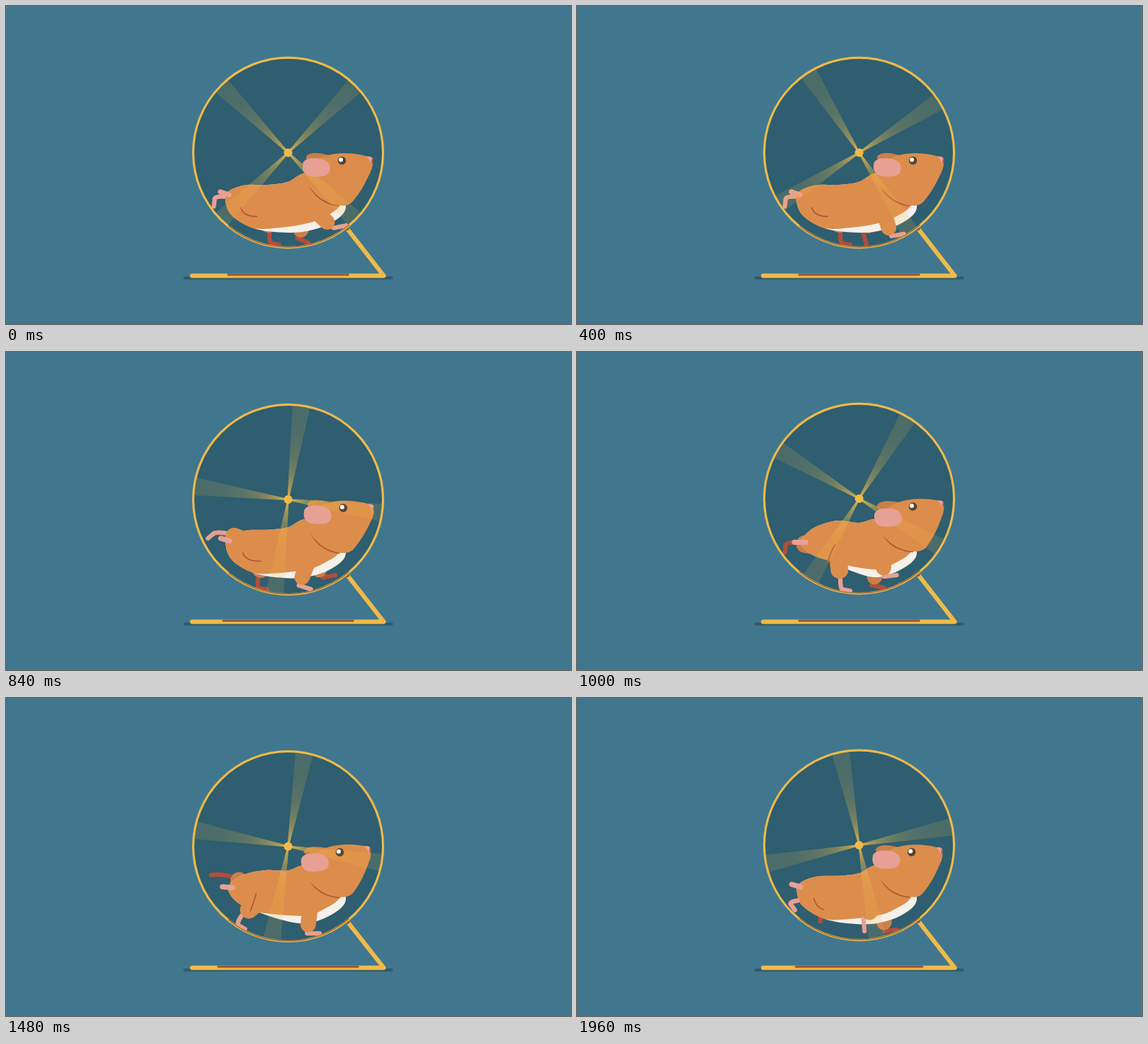
Write an HTML page with a canvas that moves like this. It is 768x432 px and loops after 2 s.

```html
<!DOCTYPE html>
<html lang="en">
<head>
<meta charset="utf-8">
<title>Hamster wheel</title>
<style>
  html, body { margin: 0; width: 100%; height: 100%; overflow: hidden; background: #40778e; }
  canvas { display: block; width: 768px; height: 432px; }
</style>
</head>
<body>
<canvas id="stage" width="768" height="432"></canvas>
<script>
const ctx = document.getElementById('stage').getContext('2d');
const STEP = 40, STEPS = 50, STRIDE = 10, FRONT_STRIDE = 8.5;
const HUB_X = 383.5, RADIUS = 129, SPIN = 28.24;
const C = {
  bg: '#40778e', disk: '#2e5e6f', gold: '#f0ba4a', brown: '#8f5a3d', shadow: '#2f5a6b',
  fur: '#dc8d4b', farFur: '#c8804b', line: '#ad5537', pink: '#e7a094', red: '#b04e3c',
  white: '#f5f0ea', eye: '#54452f'
};

// Hind ankle path, evenly spaced over one stride, with shank and foot angles
const KICK = [
  { x: 301, y: 275, shank: 172, foot: 55 },
  { x: 298, y: 246, shank: 188, foot: 140 },
  { x: 318, y: 250, shank: 185, foot: 180 },
  { x: 358, y: 309, shank: 92, foot: 10 },
  { x: 320, y: 296, shank: 124, foot: 30 }
];
const STANCE = 0.72; // share of the front stride spent on the wheel

const rad = deg => deg * Math.PI / 180;
const polar = ([x, y], deg, r) => [x + r * Math.cos(rad(deg)), y + r * Math.sin(rad(deg))];
const frac = v => v - Math.floor(v);

// The wheel sinks quickly and rises slowly, twice per stride
function bobAt(n) {
  const t = n % 5;
  return t < 2 ? t / 2 : (5 - t) / 3;
}
const hubY = n => 199.2 + 2.4 * bobAt(n);
const floorY = (x, n) => hubY(n) + Math.sqrt(RADIUS ** 2 - (x - HUB_X) ** 2);

function toward(from, to, dist) {
  const dx = to[0] - from[0], dy = to[1] - from[1], k = dist / Math.hypot(dx, dy);
  return [from[0] + dx * k, from[1] + dy * k];
}

function loopSpline(keys, phase, name) {
  const at = frac(phase) * keys.length, i = Math.floor(at), t = at - i;
  const [p, a, b, q] = [-1, 0, 1, 2].map(d => keys[(i + d + keys.length) % keys.length][name]);
  return a + t / 2 * (b - p + t * (2 * p - 5 * a + 4 * b - q + t * (3 * (a - b) + q - p)));
}

function stroke(color, width, ...pts) {
  ctx.beginPath();
  pts.forEach(p => ctx.lineTo(...p));
  ctx.strokeStyle = color;
  ctx.lineWidth = width;
  ctx.stroke();
}

function bend(color, width, a, b, c) {
  ctx.beginPath();
  ctx.moveTo(...a);
  ctx.quadraticCurveTo(...b, ...c);
  ctx.strokeStyle = color;
  ctx.lineWidth = width;
  ctx.stroke();
}

function fill(color, path) {
  ctx.fillStyle = color;
  ctx.fill(new Path2D(path));
}

function disc(color, x, y, r) {
  ctx.fillStyle = color;
  ctx.beginPath();
  ctx.arc(x, y, r, 0, 7);
  ctx.fill();
}

function arc(color, width, y, r, from, to) {
  ctx.beginPath();
  ctx.arc(HUB_X, y, r, rad(from), rad(to));
  ctx.strokeStyle = color;
  ctx.lineWidth = width;
  ctx.stroke();
}

// Closed smooth curve through points
function blob(color, pts) {
  const n = pts.length, at = i => pts[(i + n) % n];
  ctx.beginPath();
  ctx.moveTo(...pts[0]);
  for (let i = 0; i < n; i++) {
    const [p, a, b, q] = [at(i - 1), at(i), at(i + 1), at(i + 2)];
    ctx.bezierCurveTo(
      a[0] + (b[0] - p[0]) / 6, a[1] + (b[1] - p[1]) / 6,
      b[0] - (q[0] - a[0]) / 6, b[1] - (q[1] - a[1]) / 6, b[0], b[1]);
  }
  ctx.fillStyle = color;
  ctx.fill();
}

function hindLeg(phase, fur, skin) {
  const [x, y, shank, foot] = ['x', 'y', 'shank', 'foot']
    .map(name => loopSpline(KICK, phase + 0.1, name));
  const ankle = [x, y], hip = [354, 268];
  const heel = polar(ankle, shank, 13), toe = polar(heel, foot, 14);
  bend(skin, 6, ankle, heel, toward(heel, toe, 4));
  stroke(skin, 6, toward(heel, toe, 4), toe);
  stroke(fur, 24, hip, toward(ankle, hip, 13));
}

function frontLeg(phase, n, fur, skin) {
  const p = frac(phase), swing = Math.max(0, (p - STANCE) / (1 - STANCE));
  const sweep = swing ? 1 - swing ** 2 : p / STANCE;
  const x = 462 - 73 * sweep;
  const toe = [x, floorY(x, n) - 3.5 - 18 * Math.sin(Math.PI * swing)];
  const wrist = polar(toe, 168 + 105 * sweep ** 3, 17);
  const shoulder = [415, 274], elbow = toward(wrist, shoulder, 12);
  stroke(skin, 6, elbow, wrist, toe);
  stroke(fur, 21, shoulder, elbow);
}

// s is 1 with the back stretched low and -1 with it arched
function torso(s) {
  const pt = (x, y, sx, sy) => [x - sx * s, y + sy * s];
  const back = [
    [445, 238], [408, 227], pt(383, 235.5, 0, 3.5), pt(355, 236, 0, 7), pt(328, 239.5, 0, 3.5),
    pt(309, 248, 3, 1.5), pt(301, 260.5, 3, 0), pt(313, 279.5, 7, 4), pt(340.5, 293, 5, 8.5)
  ];
  const belly = pt(373, 302.5, 0, 5);
  blob(C.white, [...back, belly, [408, 306], [443, 294], [462, 273]]);
  blob(C.fur, [...back, [belly[0], belly[1] - 6.5], [408, 295.5], [430, 288], [455, 269]]);
}

// Paints in the frame of the nodding head
function onHead(n, paint) {
  const g = 2 * Math.PI * n / STRIDE;
  ctx.save();
  ctx.translate(456.6 + 3 * Math.sin(g), 210 + 1.5 * bobAt(n) + 2 * Math.sin(g));
  ctx.rotate(rad(2.7 * Math.cos(g - Math.PI / 5) - 2.5));
  ctx.translate(-457, -210);
  paint(Math.cos(g));
  ctx.restore();
}

function skull() {
  fill(C.farFur, 'M408 206C410 198 424 198 440 203L434 212L412 211Z');
  fill(C.line, 'M412 243C418 259 434 270 452 272L454 269C437 267 424 260 412 243Z');
  fill(C.fur, 'M406 230C414 207 438 200 460 200C475 200 487 203 497 206Q501 212 497 223' +
    'C490 238 483 253 470 267Q464 272 456 271C436 270 421 258 412 244Z');
  fill(C.pink, 'M490 205Q497 203 499 208Q499 213 496 215Q495 208 490 205Z');
  stroke(C.red, 1.3, [498.5, 208], [497.5, 213]);
}

function face(s) {
  disc(C.eye, 457, 210, 5.6);
  disc('#fff', 455.6, 208.8, 2.9);
  ctx.translate(0, 1.5 - 1.5 * s);
  fill(C.pink, 'M404 213C407 206 417 206 425 207C436 208 441 214 441 220' +
    'C441 229 434 232 424 231.5C411 232 401 228 404 213Z');
}

function hamster(n) {
  const gait = n / STRIDE, reach = n / FRONT_STRIDE;
  const s = Math.cos(2 * Math.PI * gait), c = Math.sin(2 * Math.PI * gait);
  hindLeg(gait + 0.5, C.farFur, C.red);
  frontLeg(reach + 0.5, n, C.farFur, C.red);
  torso(s);
  hindLeg(gait, C.fur, C.pink);
  frontLeg(reach, n, C.fur, C.pink);
  bend(C.line, 1.6, [335 - 16 * s, 268 + 6 * s], [334 - 11 * s, 278 + 8 * s],
    [341 + 9 * c, 286 - 3 * c]);
  stroke(C.pink, 7, [293.5 - 2 * s, 255.5 - 3 * s], [307 - 4 * s, 257.5 - s]);
  onHead(n, skull);
}

function spokes(n, y) {
  const glow = ctx.createRadialGradient(0, 0, 0, 0, 0, RADIUS);
  for (let r = 0; r <= 1; r += 0.1) {
    glow.addColorStop(r, `rgba(240,186,74,${0.14 + 0.86 * Math.exp(-4.6 * r)})`);
  }
  ctx.save();
  ctx.translate(HUB_X, y);
  ctx.rotate(rad(n * SPIN - 45));
  ctx.fillStyle = glow;
  for (let i = 0; i < 4; i++) {
    ctx.beginPath();
    ctx.moveTo(0, -1);
    ctx.lineTo(RADIUS - 1.5, -12);
    ctx.lineTo(RADIUS - 1.5, 12);
    ctx.lineTo(0, 1);
    ctx.fill();
    ctx.rotate(Math.PI / 2);
  }
  ctx.restore();
}

function draw(n) {
  const y = hubY(n), half = 81.5 + 13.5 * bobAt(n);
  const hub = [HUB_X, y], corner = [513.5, 366.5];
  ctx.fillStyle = C.bg;
  ctx.fillRect(0, 0, 768, 432);
  ctx.lineCap = ctx.lineJoin = 'round';
  stroke(C.shadow, 4, [243, 369.5], [524, 369.5]);
  stroke(C.gold, 5.8, hub, corner, [253, 366.5]);
  stroke(C.brown, 2.8, [HUB_X - half, 365], [HUB_X + half, 365]);
  stroke(C.brown, 5.8, hub, toward(hub, corner, RADIUS + 1.5));
  disc(C.disk, HUB_X, y, RADIUS);
  hamster(n);
  spokes(n, y);
  onHead(n, face);
  disc(C.gold, HUB_X, y, 5.8);
  arc(C.gold, 3, y, RADIUS, 0, 360);
  arc('#a0673a', 1.3, y, RADIUS - 0.6, 50, 129);
}

function tick() {
  draw(Math.floor((performance.now() + 0.5) / STEP) % STEPS);
  requestAnimationFrame(tick);
}
tick();
</script>
</body>
</html>
```
